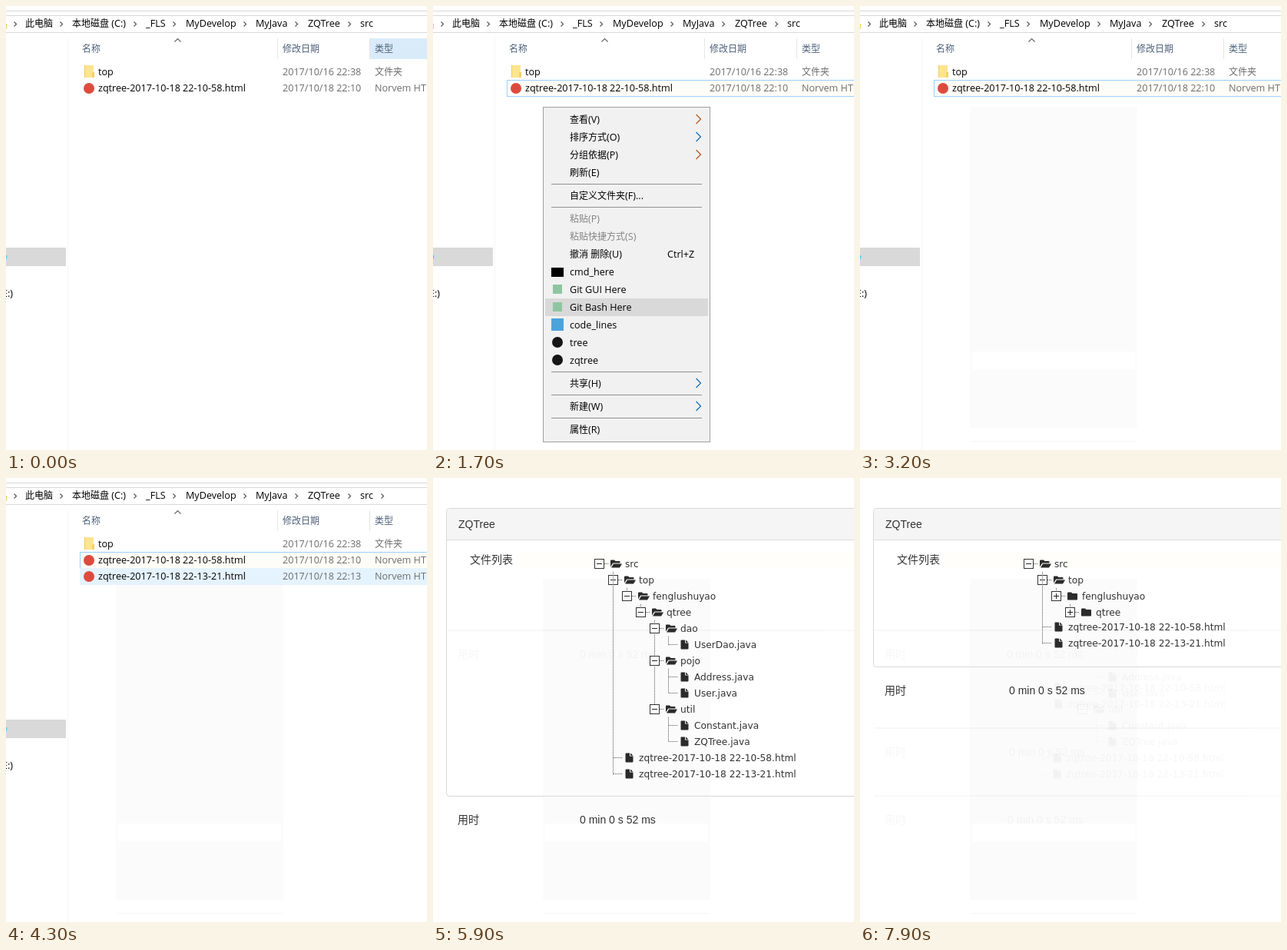
These frames come from a looping animation (548 by 577 pixels, 8000 ms). An HTML page:

```html
<!DOCTYPE html>
<html lang="zh">
<head>
<meta charset="utf-8">
<title>ZQTree</title>
<style>
html, body { margin: 0; width: 100%; height: 100%; overflow: hidden; background: #fff; }
svg { display: block; width: 548px; height: 577px; }
rect, line { shape-rendering: crispEdges; }
text { white-space: pre; }
.ui { font: 12.6px "Open Sans", "Noto Sans CJK SC", "Noto Sans CJK JP", sans-serif; }
.ui .cjk { font-size: 12px; font-family: "Noto Sans CJK SC", "Noto Sans CJK JP", sans-serif; }
.web { font: 14px "Liberation Sans", "Noto Sans CJK SC", "Noto Sans CJK JP", sans-serif; fill: #333; }
.node { font: 12.2px "DejaVu Sans", sans-serif; fill: #333; }
.dots { stroke: #555; stroke-dasharray: 1 1; }
.chev { fill: none; stroke-width: 1.2; }
</style>
</head>
<body>
<svg id="stage" viewBox="0 0 548 577"></svg>
<script>
const LOOP = 8000;

const text = (x, y, s, fill = '#000', extra = '') =>
  `<text x="${x}" y="${y}" fill="${fill}" ${extra}>` +
  s.replace(/[\u4e00-\u9fff]+/g, m => `<tspan class="cjk">${m}</tspan>`) + '</text>';
const rect = (x, y, w, h, fill, extra = '') =>
  `<rect x="${x}" y="${y}" width="${w}" height="${h}" fill="${fill}" ${extra}/>`;
const frame = (x, y, w, h, fill, stroke) =>
  rect(x + .5, y + .5, w - 1, h - 1, fill, `stroke="${stroke}"`);
const path = (d, fill) => `<path d="${d}" fill="${fill}"/>`;
const dots = (x1, y1, x2, y2) =>
  `<line class="dots" x1="${x1}" y1="${y1}" x2="${x2}" y2="${y2}"/>`;
const chevron = (x, y, r, color) =>
  `<path class="chev" stroke="${color}" d="M${x} ${y - r}l${r} ${r}l${-r} ${r}"/>`;

/* ---------- file manager ---------- */

const crumbs = [[25, '此电脑'], [86, '本地磁盘 (C:)'], [182, '_FLS'], [234, 'MyDevelop'],
  [325, 'MyJava'], [393, 'ZQTree'], [461, 'src']];
const arrows = [12, 72, 168, 219, 311, 378, 447];

function fileRow(i, name, date, type) {
  const y = 90 + 21 * i;
  const icon = i
    ? `<circle cx="108" cy="${y - 4}" r="7" fill="#dd4b3e"/>`
    : rect(102, 77, 12, 16, '#fde48f') + rect(112, 86, 3, 7, '#f5d06a') + rect(102, 77, 1, 16, '#efcb63');
  return icon + text(120, y, name) + text(360, y, date, '#6d6d6d') + text(480, y, type, '#6d6d6d');
}

const htmlFile = t => `zqtree-2017-10-18 22-${t}.html`;
const rowLook = {
  none: '',
  hover: rect(96, 96, 452, 22, '#e5f3ff'),
  tint: rect(97, 97, 451, 20, '#fffdf7'),
  focus: frame(96, 96, 460, 22, '#fffdf7', '#99d1ff')
};
const newLook = {
  plain: '',
  hover: rect(96, 117, 452, 22, '#e5f3ff'),
  picked: frame(96, 117, 460, 22, '#cce8ff', '#99d1ff')
};

// Faint area where the menu has been
const menuTrace = rect(143, 131, 218, 417, '#fbfbfb') + rect(146, 449, 212, 23, '#fff') +
  rect(143, 565, 218, 2, '#fafafa');

function explorer({ head = false, row = 'focus', fresh = '', end = false, trace = false }) {
  let s = rect(0, 0, 548, 577, '#fff');
  for (const y of [6, 12, 34]) s += rect(0, y, 548, 1, '#d9d9d9');
  s += rect(0, 23, 1, 7, '#f3cd62');
  for (const x of end ? [...arrows, 490] : arrows) s += chevron(x - 1.5, 23.5, 3, '#555');
  for (const [x, t] of crumbs) s += text(x, 27, t);
  s += rect(80, 41, 1, 536, '#f6f6f6') + rect(0, 314, 78, 24, '#d9d9d9') +
    path('M0 323q3 3 0 6z', '#5cc3f2') + text(9, 378, '(E:)', '#000', 'text-anchor="end"');
  if (trace) s += menuTrace;
  if (head) s += rect(473, 42, 75, 27, '#d9ebf9');
  s += rect(353, 42, 1, 27, '#e5e5e5') + rect(473, 42, 1, 27, '#e5e5e5');
  s += '<path class="chev" stroke="#666" d="M219.5 46.5l4 -4l4 4"/>';
  [[99, '名称'], [360, '修改日期'], [480, '类型']].forEach(([x, t]) => s += text(x, 60, t, '#4c607a'));
  s += rowLook[row] + (newLook[fresh] || '');
  s += fileRow(0, 'top', '2017/10/16 22:38', '文件夹');
  s += fileRow(1, htmlFile('10-58'), '2017/10/18 22:10', 'Norvem HTML');
  if (fresh) s += fileRow(2, htmlFile('13-21'), '2017/10/18 22:13', 'Norvem HTML');
  return `<g class="ui">${s}</g>`;
}

/* ---------- context menu ---------- */

const BROWN = '#b0561f', BLUE = '#0f6cb6', GREY = '#838383';
const items = [
  [147, '查看(V)', BROWN], [170, '排序方式(O)', BLUE], [193, '分组依据(P)', BROWN], [216, '刷新(E)'],
  [246, '自定义文件夹(F)...'], [276, '粘贴(P)'], [299, '粘贴快捷方式(S)'], [322, '撤消 删除(U)'],
  [345, 'cmd_here'], [368, 'Git GUI Here'], [391, 'Git Bash Here'], [414, 'code_lines'],
  [437, 'tree'], [460, 'zqtree'], [490, '共享(H)', BLUE], [520, '新建(W)', BLUE], [550, '属性(R)']
];

function menu(active, opacity = 1) {
  let s = frame(143, 131, 218, 436, '#f1f1f1', '#a0a0a0');
  if (active) s += rect(146, active - 11, 212, 23, '#d9d9d9');
  for (const y of [231, 261, 475, 505, 535]) s += rect(154, y, 196, 1, '#919191');
  for (const [y, t, arrow] of items) {
    s += text(178, y + 5, t, y === 276 || y === 299 ? GREY : '#000');
    if (arrow) s += chevron(342.5, y, 6, arrow);
  }
  s += text(305, 327, 'Ctrl+Z');
  s += rect(154, 340, 16, 12, '#000');
  for (const y of [368, 391]) s += rect(156, y - 6, 12, 12, '#8fc5a0');
  s += rect(154, 406, 16, 16, '#4ba3dc');
  for (const y of [437, 460]) s += `<circle cx="162" cy="${y}" r="7" fill="#151515"/>`;
  return `<g class="ui" opacity="${opacity}">${s}</g>`;
}

/* ---------- tree page ---------- */

// depth, name, kind: o open, c closed, f file
const nodes = [
  [0, 'src', 'o'], [1, 'top', 'o'], [2, 'fenglushuyao', 'o'], [3, 'qtree', 'o'],
  [4, 'dao', 'o'], [5, 'UserDao.java', 'f'],
  [4, 'pojo', 'o'], [5, 'Address.java', 'f'], [5, 'User.java', 'f'],
  [4, 'util', 'o'], [5, 'Constant.java', 'f'], [5, 'ZQTree.java', 'f']
].map((n, i) => [...n, 111 + 21 * i]);
const reports = y => [[1, htmlFile('10-58'), 'f', y], [1, htmlFile('13-21'), 'f', y + 21]];

const icons = {
  o: (x, y) => path(`M${x} ${y + 4}v-8q0 -1 1 -1h4l1.5 1.5h5q1 0 1 1v1.5h-8.5q-1 0 -1.5 1z` +
    `M${x + 1} ${y + 5}l3 -5h11l-3 5z`, '#2b2b2b'),
  c: (x, y) => path(`M${x} ${y + 4}v-8q0 -1 1 -1h4l1.5 1.5h5.5q1 0 1 1v6.5q0 1 -1 1h-11q-1 0 -1 -1z`, '#2b2b2b'),
  f: (x, y) => path(`M${x} ${y - 5}q0 -1 1 -1h4.5v4h4.5v7q0 1 -1 1h-8q-1 0 -1 -1zM${x + 6.5} ${y - 6}l3.5 3.2h-3.5z`, '#2b2b2b')
};

// Rows before `from` only serve as parents
function tree(rows, dx, from = 0) {
  let lines = '', s = '';
  rows.forEach(([d, name, kind, y], i) => {
    if (i < from) return;
    const x = 216.5 + 18 * d + dx, my = y + .5;
    const parent = rows.slice(0, i).reverse().find(r => r[0] === d - 1);
    if (parent) lines += dots(x, parent[3] + 11, x, my);
    lines += dots(x, my, x + 12, my);
    if (kind !== 'f') {
      s += frame(x - 6.5, y - 6, 13, 13, '#fff', '#333') + rect(x - 3.5, y, 7, 1, '#222');
      if (kind === 'c') s += rect(x - .5, y - 3, 1, 7, '#222');
    }
    s += icons[kind](x + (kind === 'f' ? 16 : 14.5), y + .5);
    s += `<text class="node" x="${x + 33.5}" y="${y + 5}">${name}</text>`;
  });
  return lines + s;
}

const footer = (bottom, dx) =>
  `<text class="web" x="32" y="${bottom + 36}">用时</text>` +
  `<text class="web" x="${191 + dx}" y="${bottom + 36}">0 min 0 s 52 ms</text>`;

const trail = (bottom, dx, rows) =>
  `<g opacity=".04">${rect(19, bottom - 1, 529, 2, '#666')}${footer(bottom, dx)}${tree(rows, dx)}</g>`;

const blank = rect(0, 0, 548, 577, '#fff') + menuTrace + rect(110, 97, 438, 19, '#fffefa');

// `first` is the top report row; folding branches are cut off above it
function page(rows, first, bottom, dx, trails = '') {
  const clip = `fold${first}`;
  return blank + trails +
    `<rect x="17.5" y="39.5" width="600" height="${bottom - 39}" rx="4" fill="none" stroke="#d8d8d8" style="shape-rendering:auto"/>` +
    path('M18 80v-36q0 -4 4 -4h526v40z', '#f5f5f5') + rect(18, 80, 530, 1, '#ddd') +
    '<text class="web" x="33" y="65">ZQTree</text><text class="web" x="48" y="111">文件列表</text>' +
    `<clipPath id="${clip}">${rect(0, 0, 548, first - 9, '#000')}</clipPath>` +
    `<g clip-path="url(#${clip})">${tree(rows, dx)}</g>` +
    (rows.length > 1 ? tree([nodes[0], ...reports(first)], dx, 1) : '') +
    footer(bottom, dx);
}

const close = (...names) =>
  nodes.map(([d, n, k, y]) => [d, n, names.includes(n) ? 'c' : k, y]);

const t1 = trail(198, 0, []);
const t2 = t1 + trail(413, 0, [...nodes.slice(9), ...reports(363)]);
const t3 = t1 + trail(325, 3, reports(272)) + trail(413, 1, [...nodes.slice(7), ...reports(363)]);
const folded = close('qtree'), all = page(nodes, 363, 413, 0, t1);

/* ---------- timeline ---------- */

const base = explorer({}), after = explorer({ trace: true });
const scenes = [
  [0, explorer({ head: true, row: 'none' })],
  [100, explorer({ row: 'hover' })],
  [200, explorer({ row: 'tint' })],
  [1200, base],
  [1300, base + menu(0)],
  [1400, base + menu(147)],
  [1500, base + menu(193)],
  [1600, base + menu(345)],
  [1700, base + menu(391)],
  [1900, base + menu(414)],
  [2000, base + menu(437)],
  [2200, base + menu(460)],
  [2700, base + menu(460, .55)],
  [2800, base + menu(460, .2)],
  [2900, after],
  [4000, explorer({ fresh: 'plain', trace: true })],
  [4300, explorer({ fresh: 'hover', end: true, trace: true })],
  [5000, explorer({ row: 'tint', fresh: 'picked', end: true, trace: true })],
  [5500, blank],
  [5800, page([[0, 'src', 'c', 111]], 132, 198, 0)],
  [5900, all],
  [6200, all + rect(268, 138, 20, 1, '#333')],
  [6500, all],
  [7200, page(folded, 362, 412, 3, t1)],
  [7300, page(folded, 272, 325, 3, t2)],
  [7400, page(folded.slice(0, 4), 195, 245, 3, t3)],
  [7900, page(close('fenglushuyao', 'qtree').slice(0, 4), 193, 245, 3, t3)]
];

const stage = document.getElementById('stage');
stage.innerHTML = scenes.map(s => `<g display="none">${s[1]}</g>`).join('');
const layers = [...stage.children];

// Branch clips are shared by several layers, so keep one copy outside them
const defs = document.createElementNS('http://www.w3.org/2000/svg', 'defs');
for (const c of stage.querySelectorAll('clipPath')) {
  if (defs.querySelector('#' + c.id)) c.remove();
  else defs.append(c);
}
stage.append(defs);
let shown = -1;

function draw(now) {
  const t = now % LOOP;
  let i = scenes.length - 1;
  while (scenes[i][0] > t) i--;
  if (i !== shown) {
    if (shown >= 0) layers[shown].setAttribute('display', 'none');
    layers[i].removeAttribute('display');
    shown = i;
  }
}

const start = performance.now();
function tick() {
  draw(performance.now() - start);
  requestAnimationFrame(tick);
}
tick();
</script>
</body>
</html>
```
